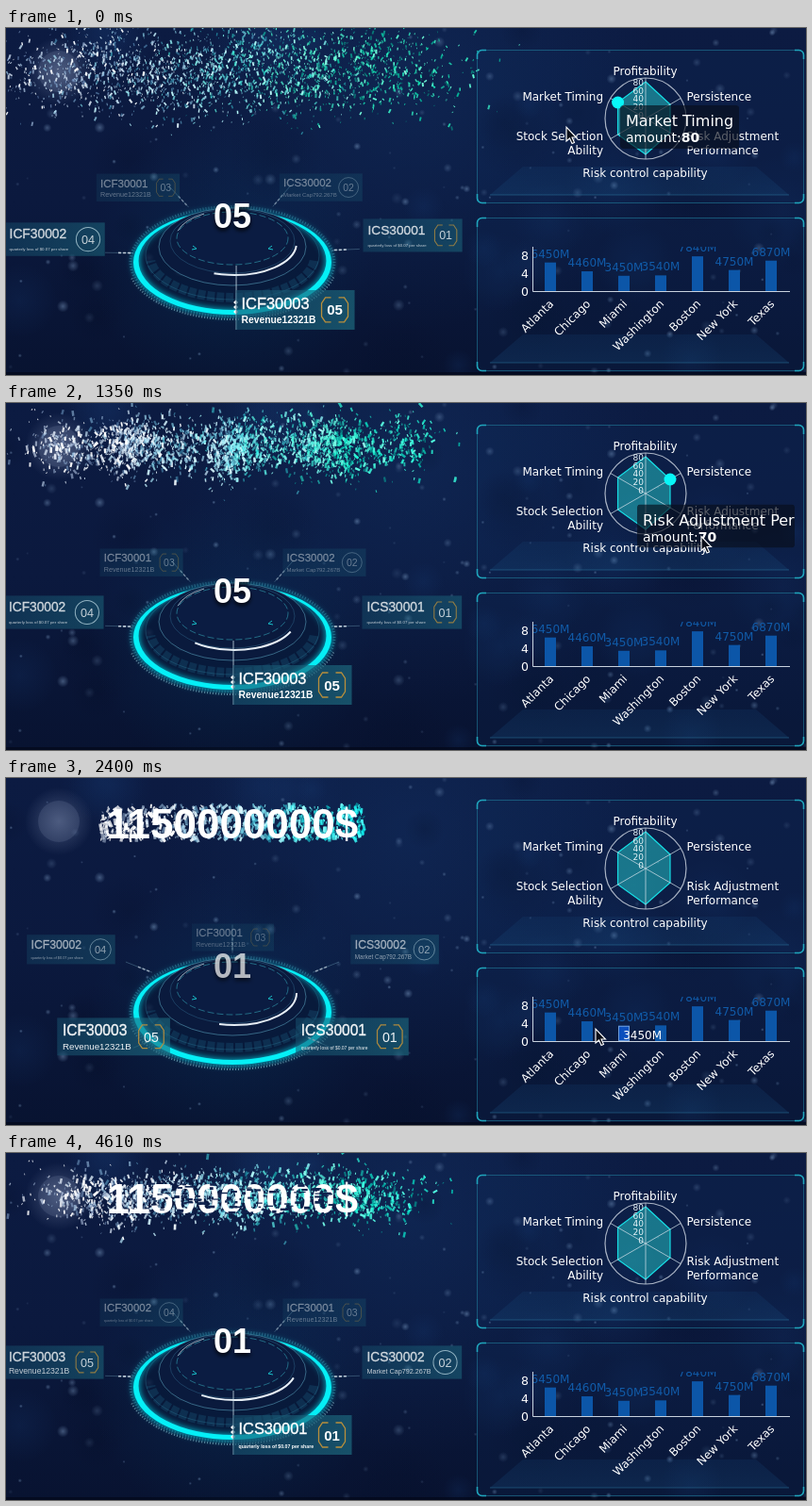
Recreate the animation shown at these times as an HTML page with a canvas. Size 848 px wide and 368 px high, loop 4.71 s.

```html
<!DOCTYPE html>
<html lang="en">
<head>
<meta charset="utf-8">
<title>Market dashboard</title>
<style>
html, body { margin: 0; width: 100%; height: 100%; overflow: hidden; background: #0a1636; }
canvas { display: block; width: 848px; height: 368px; }
</style>
</head>
<body>
<canvas id="stage" width="848" height="368"></canvas>
<script>
const c = document.getElementById('stage').getContext('2d');
const LOOP = 4710, STEP = 150, CYCLE = 2990, BURST = 4480;
const TAU = Math.PI * 2, RAD = Math.PI / 180;
const LABEL = '"DejaVu Sans", sans-serif', HEAD = '"Liberation Sans", Arial, sans-serif';
const SMALL = `12px ${LABEL}`;

let seed = 1;
const rnd = () => (seed = seed * 16807 % 2147483647) / 2147483647;
const spread = () => rnd() + rnd() + rnd() - 1.5;
const mix = (a, b, k) => a + (b - a) * k;
const progress = (t, from, to) => Math.min(1, Math.max(0, (t - from) / (to - from)));

// Linear interpolation through rows of [time, value, ...]
function track(t, rows) {
  let i = 1;
  while (i < rows.length - 1 && rows[i][0] < t) i++;
  const [a, b] = [rows[i - 1], rows[i]], k = progress(t, a[0], b[0]);
  return a.slice(1).map((v, j) => mix(v, b[j + 1], k));
}

function text(str, x, y, font, fill = '#fff', align = 'left', base = 'alphabetic') {
  c.font = font; c.fillStyle = fill; c.textAlign = align; c.textBaseline = base;
  c.fillText(str, x, y);
}
function path(points, close) {
  c.beginPath();
  points.forEach(p => c.lineTo(p[0], p[1]));
  if (close) c.closePath();
}
function stroke(color, width = 1) { c.strokeStyle = color; c.lineWidth = width; c.stroke(); }
function fill(color) { c.fillStyle = color; c.fill(); }
function ellipse(x, y, rx, ry, from = 0, to = 360) {
  c.beginPath(); c.ellipse(x, y, rx, ry, 0, from * RAD, to * RAD);
}
function dashed(pattern, color, width) {
  c.setLineDash(pattern); stroke(color, width); c.setLineDash([]);
}
function dot(x, y, r, color) { ellipse(x, y, r, r); fill(color); }
function glow(x, y, r, rgb, alpha) {
  const g = c.createRadialGradient(x, y, 0, x, y, r);
  g.addColorStop(0, `rgba(${rgb},${alpha})`);
  g.addColorStop(1, `rgba(${rgb},0)`);
  c.fillStyle = g; c.fillRect(x - r, y - r, 2 * r, 2 * r);
}

function background() {
  const g = c.createLinearGradient(0, 0, 0, 368);
  g.addColorStop(0, '#0c1b42'); g.addColorStop(.5, '#0b193e'); g.addColorStop(1, '#081331');
  c.fillStyle = g; c.fillRect(0, 0, 848, 368);
  glow(430, 60, 260, '22,62,120', .3);
  seed = 77;
  for (let i = 0; i < 40; i++) glow(rnd() * 848, rnd() * 368, 15 + rnd() * 45, i % 2 ? '24,62,120' : '4,12,36', .2);
  for (let i = 0; i < 150; i++) glow(rnd() * 848, rnd() * 368, 1.5 + 5 * rnd() ** 2, '150,185,225', .1 + rnd() * .35);
  dot(56, 46, 22, 'rgba(120,135,170,.2)');
  glow(56, 46, 36, '140,155,190', .4);
  c.fillStyle = 'rgba(2,6,20,.6)'; c.fillRect(0, 365, 848, 3);
}

function panel(y) {
  const outline = () => { c.beginPath(); c.roundRect(499.5, y + .5, 346, 162, 5); };
  outline(); fill('rgba(18,54,110,.13)'); stroke('rgba(32,125,155,.6)');
  c.save();
  c.beginPath();
  for (const x of [497, 836]) for (const dy of [-2, 153]) c.rect(x, y + dy, 12, 12);
  c.clip();
  outline(); stroke('#1fa6bd', 1.6);
  c.restore();
  path([[548, y + 124], [795, y + 124], [830, y + 154], [513, y + 154]], true);
  const g = c.createLinearGradient(0, y + 124, 0, y + 154);
  g.addColorStop(0, 'rgba(20,65,115,.22)'); g.addColorStop(1, 'rgba(26,80,130,.25)');
  fill(g);
  path([[513, y + 154], [830, y + 154]]); stroke('rgba(50,140,180,.4)');
}

const onRadar = (axis, r) => {
  const a = (axis * 60 - 90) * RAD;
  return [678 + r * Math.cos(a), 96 + r * Math.sin(a)];
};
const SCORES = [39, 30, 30, 38, 34, 34].map((r, axis) => onRadar(axis, r));
const HOVERS = [['Market Timing', 80, 5], ['Risk control capability', 80, 3],
  ['Risk Adjustment Performance', 70, 3], ['Risk Adjustment Performance', 70, 1]];

function radar(t) {
  ellipse(678, 96, 43, 43); stroke('#a9b3c4', 1.2);
  path(SCORES, true); fill('rgba(38,190,195,.55)'); stroke('#16dfe6', 1.2);
  for (let axis = 0; axis < 6; axis++) {
    path([[678, 96], onRadar(axis, 43)]); stroke('rgba(205,220,230,.75)');
  }
  for (let i = 0; i < 5; i++) text(80 - i * 20, 676, 61 + i * 8.7, `9px ${LABEL}`, '#e8f4f8', 'right');
  text('Profitability', 677.5, 49.5, SMALL, '#fff', 'center');
  text('Risk control capability', 677.5, 158, SMALL, '#fff', 'center');
  ['Market Timing', 'Stock Selection', 'Ability'].forEach((s, i) => text(s, 633, [77, 119, 134][i], SMALL, '#fff', 'right'));
  ['Persistence', 'Risk Adjustment', 'Performance'].forEach((s, i) => text(s, 721.5, [77, 119, 134][i], SMALL));
  if (t < 2100) radarTip(t);
}

function radarTip(t) {
  const stage = Math.min(3, Math.floor(t / 450)), [title, value, axis] = HOVERS[stage];
  if (stage === 2) { dot(...SCORES[axis], 4.5, '#129a92'); dot(...SCORES[2], 2, '#0ff'); }
  else dot(...SCORES[axis], 6.5, '#08f6f8');
  const [x, y] = track(t, [[0, 651, 82], [900, 633, 130], [1800, 705, 85]]);
  const font = `16px ${LABEL}`;
  c.font = font;
  const width = Math.min(836 - x, c.measureText(title).width + 12);
  c.save();
  c.beginPath(); c.roundRect(x, y, width, 46, 3); c.clip();
  fill('rgba(8,14,28,.66)');
  text(title, x + 6, y + 22, font);
  text('amount:', x + 6, y + 39, `14px ${LABEL}`);
  text(value, x + 6 + c.measureText('amount:').width, y + 39, `bold 14px ${LABEL}`);
  c.restore();
}

const CITIES = [['Atlanta', 6450], ['Chicago', 4460], ['Miami', 3450], ['Washington', 3540], ['Boston', 7840], ['New York', 4750], ['Texas', 6870]];

function bars(t) {
  // The highlight and the value trail behind the pointer.
  const [overX, overY] = pointerAt(t - STEP);
  const hover = overY > 230 && overY < 300 ? Math.round((overX - 577) / 39) : -1;
  CITIES.forEach(([city, value], i) => {
    const x = 577 + i * 39, h = value * 4.7 / 1000, active = i === hover;
    c.fillStyle = active ? '#0b4fbd' : '#0c56a8';
    c.fillRect(x - 6, 279 - h, 12, h);
    if (active) { c.strokeStyle = '#6f9fdc'; c.lineWidth = 1; c.strokeRect(x - 5.5, 279.5 - h, 11, h - 1); }
    c.save();
    c.beginPath(); c.rect(558, 232, 274, 60); c.clip();
    text(value + 'M', x, 274 - h, SMALL, '#115ba8', 'center');
    c.restore();
    c.save();
    c.translate(x + 2, 291); c.rotate(-45 * RAD);
    text(city, 0, 0, SMALL, '#fff', 'right', 'middle');
    c.restore();
  });
  path([[558.5, 232], [558.5, 279.5], [831, 279.5]]); stroke('#c9d2de');
  for (let i = 0; i < 3; i++) text(8 - i * 4, 554, 245.5 + i * 19, `12.5px ${LABEL}`, '#fff', 'right');
  if (hover >= 0) text(CITIES[hover][1] + 'M', pointerAt(t - 2 * STEP)[0], 277, SMALL, '#fff', 'center');
}

const pointerAt = t => track(t, [[0, 594, 105], [900, 760, 143], [1800, 714, 140], [2250, 655, 235],
  [2400, 625, 266], [3000, 735, 265], [3450, 807, 285], [3750, 807, 285], [4200, 815, 338]]);
const ARROW = new Path2D('M0 0V15L3.5 12L6 17.5L8.5 16.5L6 11H10.5Z');

function pointer(t) {
  if (t > 4200) return;
  c.save();
  c.translate(...pointerAt(t));
  c.fillStyle = '#0a0e18'; c.fill(ARROW);
  c.strokeStyle = '#fff'; c.lineWidth = 1.1; c.stroke(ARROW);
  c.restore();
}

function disc(t) {
  glow(240, 248, 150, '10,80,125', .22);
  ellipse(240, 248, 108, 58.5); dashed([1, 2], 'rgba(120,215,235,.3)', 3);
  ellipse(240, 249, 111, 60, 15, 165); dashed([1, 2], 'rgba(190,235,245,.5)', 2);
  ellipse(240, 247, 99, 51); fill('rgba(7,24,56,.75)');

  c.save();
  c.shadowColor = '#00dff0'; c.shadowBlur = 7;
  ellipse(240, 248.5, 105, 55.5);
  c.moveTo(339.5, 247); c.ellipse(240, 247, 99.5, 52, 0, 0, TAU);
  c.fillStyle = '#05eff6'; c.fill('evenodd');
  c.restore();

  ellipse(240, 243, 87, 43, 5, 175); dashed([8, 2], 'rgba(40,125,160,.22)', 10);
  ellipse(240, 241, 92, 47); stroke('rgba(50,140,170,.3)');
  ellipse(240, 232, 78, 41); fill('#0a1a3d'); stroke('rgba(100,180,205,.5)');
  ellipse(240, 226, 66, 34); stroke('rgba(60,130,165,.35)');
  ellipse(240, 223, 59, 28); fill('#0b1c42'); dashed([7, 3], 'rgba(60,190,205,.5)', 1);
  ellipse(240, 223, 60, 30, 195, 240); stroke('rgba(210,230,240,.7)');
  for (const s of [-1, 1]) { path([[240 + s * 42, 231], [240 + s * 38, 234], [240 + s * 43, 235]]); stroke('#19bfc9'); }

  const [turn] = track(t % CYCLE, [[0, 5], [600, 36], [900, 36], [2400, 0], [CYCLE, 5]]);
  ellipse(242, 228, 66, 34, turn, turn + 104); stroke('#e6eef6', 2);

  c.save();
  c.globalAlpha = t < 2250 ? 1 : mix(.4, 1, progress(t, 2250, 2550));
  c.shadowColor = '#000c'; c.shadowBlur = 4; c.shadowOffsetY = 3;
  text(t < 2250 ? '05' : '01', 240, 212, `bold 36px ${HEAD}`, '#fff', 'center');
  c.restore();
}

const LOSS = ['quarterly loss of $0.07 per share', 5.2], REVENUE = ['Revenue12321B', 10.3];
const CARDS = [['ICS30001', LOSS], ['ICS30002', ['Market Cap792.267B', 8.6]], ['ICF30001', REVENUE], ['ICF30002', LOSS], ['ICF30003', REVENUE]];

// Cards ride a tilted ring: slot 0 is the front, each slot is 72 degrees on.
function card(k, slot) {
  const [title, [note, size]] = CARDS[k];
  const away = Math.min(slot, 5 - slot), front = away < .2;
  const cos = Math.cos((90 + slot * 72) * RAD), sin = Math.sin((90 + slot * 72) * RAD);
  const scale = .785 + .155 * sin + .06 * sin * sin, alpha = .65 + .35 * sin;
  const aside = 63 * Math.max(0, 1 - away * 2);
  const x = 240.5 + (190 + 31 * sin) * cos + aside - 63 * scale;
  const y = 198.5 + 65 * sin + 35.5 * sin * sin - 21 * scale;

  if (front) {
    path([[x + .5, 252], [x + .5, 320]]); stroke('rgba(210,230,240,.75)');
    for (let d = 291; d < 302; d += 5) { path([[x, d - 2.5], [x + 2.5, d], [x, d + 2.5], [x - 2.5, d]], true); fill('#fff'); }
  } else {
    const depth = 1 / (1 - .32 * sin), px = 240 + 107 * depth * cos, py = 218.4 + 54 * depth * sin;
    const a = Math.atan2(py - 240, px - 240), at = d => [px + d * Math.cos(a), py + d * Math.sin(a)];
    path([at(-8), at(22)]); stroke('rgba(140,195,215,.3)');
    path([at(-5), at(9)]); dashed([3, 2], `rgba(240,250,255,${alpha})`, 1.6);
  }

  c.save();
  c.translate(x, y); c.scale(scale, scale); c.globalAlpha = alpha;
  const g = c.createLinearGradient(0, 0, 126, 42);
  g.addColorStop(0, 'rgba(22,78,108,.6)'); g.addColorStop(1, 'rgba(30,112,132,.66)');
  c.fillStyle = g; c.fillRect(0, 0, 126, 42);
  const weight = front ? 'bold ' : '';
  text(title, 6, 20, `16.4px ${HEAD}`);
  c.strokeStyle = '#fff'; c.lineWidth = .4; c.strokeText(title, 6, 20);
  text(note, 6, 35, `${weight}${size}px ${HEAD}`);
  text('0' + (k + 1), 105, 26.5, `${weight}15px ${HEAD}`, '#fff', 'center');
  if (k % 2) { ellipse(105, 21, 15, 15); stroke('#b9d6e0', 1.2); }
  else for (const m of [-1, 1]) {
    path([[4, 8], [10, 8], [14, 14], [14, 28], [10, 34], [4, 34]].map(p => [105 + m * p[0], p[1]]));
    stroke('#b98f3c', 1.3);
  }
  c.restore();
}

function carousel(t) {
  const [shift] = track(t, [[0, -.02], [600, 0], [2100, 0], [2400, .5], [2700, .88], [CYCLE, .98], [3600, 1]]);
  CARDS.map((_, k) => [k, (4 - k + shift + 5) % 5])
    .sort((a, b) => Math.abs(2.5 - a[1]) - Math.abs(2.5 - b[1]))
    .forEach(([k, slot]) => card(k, slot));
}

function particles(t) {
  const burst = progress(t, BURST, LOOP), bursting = t >= BURST;
  const amount = bursting ? burst : 1 - progress(t, 1900, 2600);
  const loose = bursting ? burst ** 2 : (1 - progress(t, 900, 2400)) ** 1.3;
  const bunch = bursting ? 0 : Math.sin(Math.PI * progress(t, 0, 1800));
  seed = 4242;
  for (let i = 0; i < 2600 && amount; i++) {
    const u = rnd(), homeY = 29 + rnd() * 36, away = loose ** (.4 + rnd() * 1.2);
    let farX = 235 + (u - .5) * 390 + spread() * 90;
    farX -= bunch * 22 * Math.sin((farX - 240) * TAU / 115);
    const farY = 46 + spread() * 46, tilt = spread() * .9, shade = rnd();
    const size = (.6 + 1.5 * rnd() ** 2) * mix(1.7, 1, loose);
    if (rnd() > amount) continue;
    const x = mix(100 + u * 280, farX, away);
    const y = mix(homeY, farY, away) + Math.sin(x / 23 + t / 300) * 5 * away;
    const hue = mix(216, mix(179, 165, loose), Math.min(1, u * 1.3));
    const light = mix(86, 50, u) + (shade - .4) * 30 + (1 - loose) * 14 * (1 - u);
    c.save();
    c.translate(x, y); c.rotate(tilt);
    c.fillStyle = `hsla(${hue},${mix(65, 100, u)}%,${light}%,${.4 + shade * .6})`;
    c.fillRect(-size / 2, -size, size, size * 2.3);
    c.restore();
  }
}

function amountText(t) {
  particles(t);
  c.globalAlpha = progress(t, 1800, 2300);
  text('1150000000$', 106.5, 64, `bold 44px ${HEAD}`);
  c.globalAlpha = 1;
  seed = 99;
  c.fillStyle = '#10244f';
  for (let i = 0; i < (t - BURST) * .6; i++) c.fillRect(150 + rnd() * 195, 31 + rnd() * 33, 2 + rnd() * 7, 1 + rnd() * 2);
}

function draw(t) {
  background();
  amountText(t);
  disc(t);
  carousel(t);
  panel(23);
  panel(201);
  bars(t);
  radar(t);
  pointer(t);
}

// The picture advances in steps rather than continuously.
let shown = -1;
const start = performance.now();
function tick() {
  const t = (performance.now() - start) % LOOP;
  const step = Math.min(31, Math.floor((t + 12) / 149));
  if (step !== shown) draw((shown = step) * STEP);
  requestAnimationFrame(tick);
}
tick();
</script>
</body>
</html>
```
